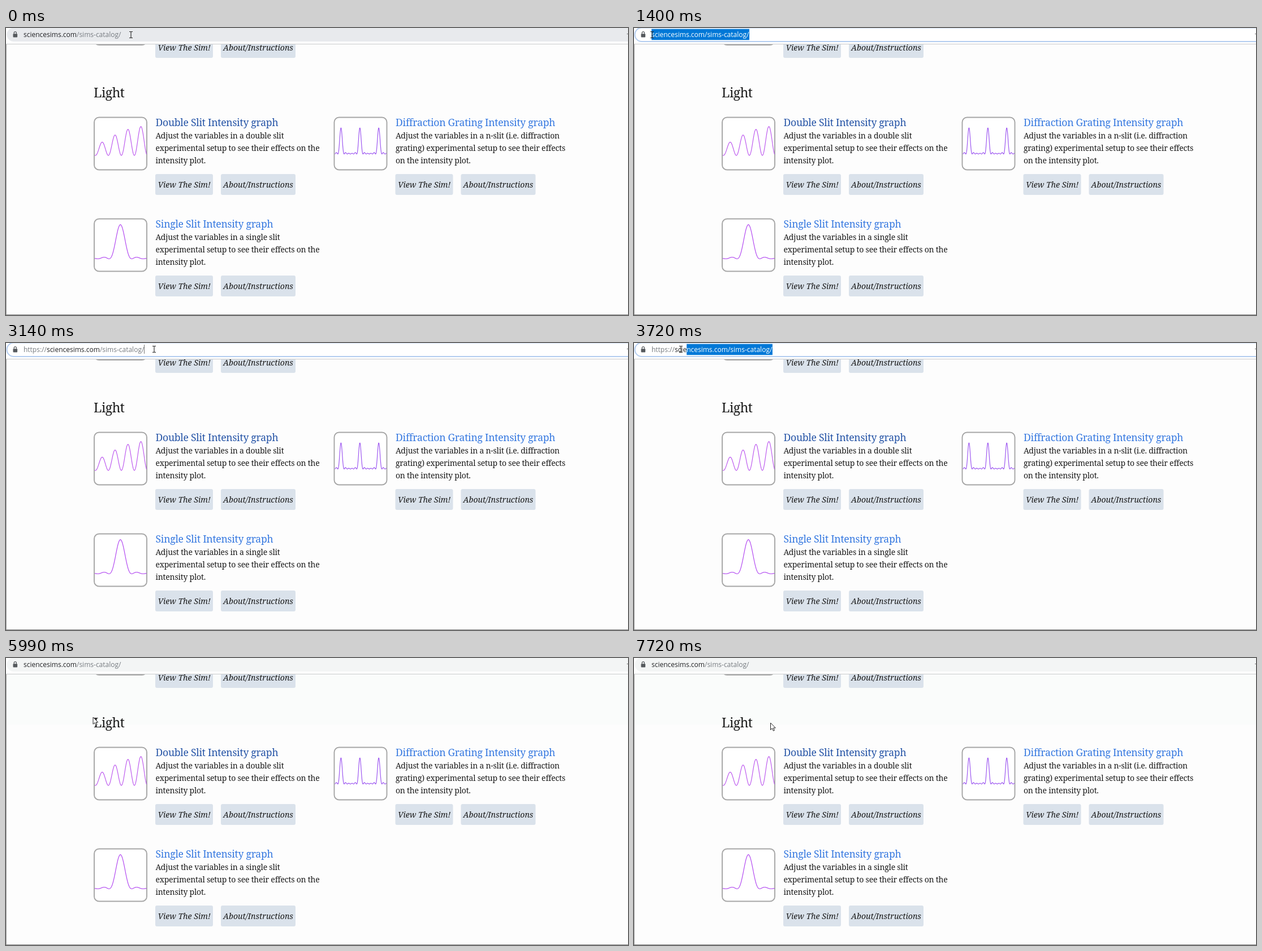
These frames come from a looping animation (1100x509 px, 8000 ms). An HTML page:

```html
<!DOCTYPE html>
<html lang="en">
<head>
<meta charset="utf-8">
<title>Sims catalog</title>
<style>
  html, body { margin: 0; width: 100%; height: 100%; overflow: hidden; background: #fdfdfd; }
  svg { display: block; width: 100vw; height: 100vh; }
  text { font-family: "Noto Serif", serif; fill: #1a1a1a; }
  .body { font-size: 14px; letter-spacing: -.215px; }
  .title { font-size: 17.6px; letter-spacing: -.27px; fill: #3578e0; }
  .visited { fill: #2453a6; }
  .button { font-size: 14.15px; font-style: italic; text-anchor: middle; }
  .section { font-size: 23px; letter-spacing: -.45px; }
  .url, .url tspan { font-family: "Open Sans", "Noto Sans", sans-serif; font-size: 12px; }
  .soft { fill: #767b80; }
  .strong { fill: #202124; }
  .marked { fill: #fff; }
</style>
</head>
<body>
<svg viewBox="0 0 1100 509" preserveAspectRatio="none">
  <defs>
    <clipPath id="pageClip"><rect y="29" width="1100" height="479"/></clipPath>
    <clipPath id="urlClip"><rect id="urlRange" y="1.5" height="20"/></clipPath>
    <clipPath id="lightClip"><rect id="lightRange" y="98" height="33"/></clipPath>
  </defs>
  <rect width="1100" height="509" fill="#fdfdfd"/>
  <rect id="tint" y="29" width="1100" height="89" fill="#fafcfb"/>
  <g id="page" clip-path="url(#pageClip)"></g>
  <text class="section" id="light" x="155" y="123">Light</text>
  <g id="lightMark" clip-path="url(#lightClip)">
    <rect x="150" y="98" width="70" height="33" fill="#0078d7"/>
    <text class="section marked" x="155" y="123">Light</text>
  </g>

  <rect width="1100" height="28" fill="#fff"/>
  <rect id="bar" x="1.5" y="-.5" width="1130" height="24.5" rx="12.25" stroke-width="2"/>
  <path d="M0 28.5H1100" stroke="#c9cacb"/>
  <path d="M.5 29V509" stroke="#a2a2a2"/>
  <path d="M0 508.5H1100" stroke="#858585"/>
  <path d="M1098 10.5H1100" stroke="#777"/>
  <rect x="12.5" y="10.3" width="7.6" height="6.2" rx="1" fill="#55595d"/>
  <path d="M14.2 10.5V8.8a2.1 2.1 0 0 1 4.2 0V10.5" fill="none" stroke="#55595d" stroke-width="1.2"/>
  <text class="url" id="url" x="31" y="16"><tspan class="soft" id="scheme"></tspan><tspan class="strong">sciencesims.com</tspan><tspan class="soft">/sims-catalog/</tspan></text>
  <g id="urlMark" clip-path="url(#urlClip)">
    <rect x="25" y="1.5" width="240" height="20" fill="#0078d7"/>
    <text class="url marked" id="urlCopy" x="31" y="16"></text>
  </g>
  <path id="caret" d="M0 3V19" stroke="#777"/>
  <path id="beam" d="M-3 -5.5H-1L0 -5L1 -5.5H3M0 -5V5M-3 5.5H-1L0 5L1 5.5H3" fill="none" stroke="#222" stroke-width="1.1"/>
  <path id="arrow" d="M0 0V12.3L2.9 9.7L4.9 14.2L6.9 13.3L5 9H8.8Z" fill="#fff" stroke="#222"/>
</svg>
<script>
const LOOP = 8000;
const TICK = 137.5; // the pointer is sampled at this interval
const FOCUS = 140, DRAG_ALL = 1060, CLICK_END = 2805, DRAG_BACK = 3300;
const LEAVE = 5430, MARK_LIGHT = 6500, UNMARK_LIGHT = 7720;

const $ = id => document.getElementById(id);

function add(tag, attrs, text) {
  const el = document.createElementNS("http://www.w3.org/2000/svg", tag);
  for (const key in attrs) el.setAttribute(key, attrs[key]);
  if (text) el.textContent = text;
  $("page").appendChild(el);
}

function button(x, y, width, label) {
  add("rect", { x, y, width, height: 37, rx: 3, fill: "#dae2eb" });
  add("text", { class: "button", x: x + width / 2, y: y + 23.5 }, label);
}

function buttons(x, y) {
  button(x, y, 102, "View The Sim!");
  button(x + 116, y, 132, "About/Instructions");
}

function thumb(x, y) {
  add("rect", { x, y, width: 93, height: 93, rx: 8.5, fill: "#fff", stroke: "#a6a6a6", "stroke-width": 1.9 });
}

// f gives the intensity, 0 to 1, at x
function curve(left, base, height, f, stroke) {
  let d = "";
  for (let x = left; x <= left + 91.5; x += 0.5) {
    d += `${d ? "L" : "M"}${x} ${(base - height * f(x)).toFixed(2)}`;
  }
  add("path", { d, fill: "none", stroke, "stroke-width": 1.15, "stroke-linejoin": "round" });
}

function card(x, y, title, lines, cls = "") {
  thumb(x + 0.5, y + 0.5);
  add("text", { class: `title ${cls}`, x: x + 109, y: y + 16 }, title);
  lines.forEach((line, i) => add("text", { class: "body", x: x + 109, y: y + 38.4 + i * 21.8 }, line));
  buttons(x + 108.5, y + 101);
}

const slitText = kind => [
  `Adjust the variables in a ${kind} slit`,
  "experimental setup to see their effects on the",
  "intensity plot."
];

// Interference of n slits; peaks at center + k * period
function slits(n, x, center, period) {
  const a = Math.PI * (x - center) / period + 1e-6;
  return (Math.sin(n * a) / (n * Math.sin(a))) ** 2;
}

function singleSlit(x) {
  const a = Math.PI * (x - 202.3) / 20 + 1e-6;
  return (Math.sin(a) / a) ** 2;
}

thumb(156, -63);
buttons(264, 16);
card(155.5, 158, "Double Slit Intensity graph", slitText("double"), "visited");
card(580, 158, "Diffraction Grating Intensity graph", [
  "Adjust the variables in a n-slit (i.e. diffraction",
  "grating) experimental setup to see their effects",
  "on the intensity plot."]);
card(155.5, 338, "Single Slit Intensity graph", slitText("single"));
curve(157, 226, 51.5, x => slits(2, x, 169.5, 23) * Math.cos((x - 245) * 0.011) ** 2, "#bb55ee");
curve(581.5, 223.5, 46.5, x => slits(6, x, 625.8, 33.4), "#9a52f0");
curve(157, 409.3, 60.5, singleSlit, "#b044f0");

// Pointer moves from its resting place: start, end, x, y
const HOME = [221, 12];
const MOVES = [
  [DRAG_ALL, 1350, 32, 12], [1400, 1700, 8, 14], [1960, 2475, 226, 11],
  [2600, 3000, 262, 11], [DRAG_BACK, 3825, 34, 11], [4600, 4930, 168, 88],
  [LEAVE, 5900, 154, 105], [6450, 7100, 241.5, 115]
];

function pointerAt(t) {
  return MOVES.reduce(([x, y], [start, end, toX, toY]) => {
    const k = Math.min(1, Math.max(0, (t - start) / (end - start)));
    return [x + (toX - x) * k, y + (toY - y) * k];
  }, HOME);
}

// x of every gap between characters
function edges(el) {
  const n = el.getNumberOfChars();
  const xs = Array.from({ length: n }, (_, i) => el.getStartPositionOfChar(i).x);
  return xs.concat(el.getEndPositionOfChar(n - 1).x);
}

const nearest = (xs, x) => xs.reduce((a, b) => Math.abs(b - x) < Math.abs(a - x) ? b : a);
const show = (id, on) => $(id).setAttribute("visibility", on ? "visible" : "hidden");
const place = (id, x, y) => $(id).setAttribute("transform", `translate(${x} ${y})`);

function range(id, from, to) {
  $(id).setAttribute("x", from);
  $(id).setAttribute("width", Math.max(0, to - from));
}

function drawUrl(t, stepped) {
  const within = (from, to) => t >= from && t < to;
  const focused = within(FOCUS, LEAVE);
  $("bar").setAttribute("fill", focused ? "#fff" : t < FOCUS ? "#e8eaed" : "#f3f5f5");
  $("bar").setAttribute("stroke", focused ? "#b4cdf0" : "none");

  $("scheme").textContent = within(CLICK_END, LEAVE) ? "https://" : "";
  $("urlCopy").textContent = $("url").textContent;
  const xs = edges($("url"));
  const end = xs[xs.length - 1];

  // The selection trails the pointer slightly, then stays whole
  const released = within(1500, CLICK_END) || t >= 4000;
  const from = released ? xs[0] : nearest(xs, pointerAt(stepped - 20)[0]);
  const selecting = within(DRAG_ALL, CLICK_END) || within(DRAG_BACK, LEAVE);
  show("urlMark", selecting);
  range("urlRange", from, end + 0.5);

  show("caret", focused && !selecting && (t - FOCUS) % 1000 < 500);
  place("caret", Math.round(end) + 0.5, 0);
}

function draw(t) {
  const stepped = Math.floor(t / TICK) * TICK;
  const [x, y] = pointerAt(stepped);
  const marking = t >= MARK_LIGHT && t < UNMARK_LIGHT;
  drawUrl(t, stepped);

  show("tint", t >= LEAVE);
  const lightXs = edges($("light"));
  show("lightMark", marking);
  range("lightRange", lightXs[0], nearest(lightXs, x));

  const isBeam = y < 25 || (marking && x < 215);
  show("beam", isBeam);
  show("arrow", !isBeam);
  place("beam", x, y);
  place("arrow", x, y);
}

const begin = performance.now();
function tick() {
  draw((performance.now() - begin) % LOOP);
  requestAnimationFrame(tick);
}
tick();
</script>
</body>
</html>
```
